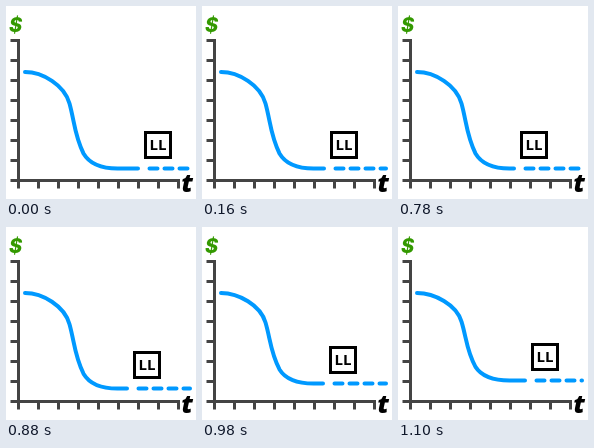
An HTML page for the animation above (6120 ms loop, 190x193 px).

```html
<!DOCTYPE html>
<html lang="en">
<head>
<meta charset="utf-8">
<style>
  html, body { margin: 0; width: 100%; height: 100%; overflow: hidden; background: #fff; }
  svg { display: block; width: 190px; height: 193px; }
  .axes { stroke: #444; stroke-width: 3; fill: none; }
  .line { stroke: #09f; stroke-width: 4; fill: none; stroke-linecap: round; }
  .price { font: italic 800 20px Inter, sans-serif; fill: #390; }
  .time { font: italic 800 25px "Open Sans", "Noto Sans", sans-serif; }
  .tag { font: 700 15px "Open Sans", "Noto Sans", sans-serif; text-anchor: middle; }
</style>
</head>
<body>
<svg viewBox="0 0 190 193">
  <path class="axes" id="axes" transform="translate(.5 .5)"/>
  <path class="line" id="curve"/>
  <path class="line" id="forecast" stroke-dasharray="8 7"/>
  <g id="box">
    <rect x="1.5" y="1.5" width="25" height="25" fill="#fff" stroke="#000" stroke-width="3"/>
    <text class="tag" x="14" y="19">LL</text>
  </g>
  <text class="price" x="3" y="25.5">$</text>
  <text class="time" x="175.5" y="185.5">t</text>
</svg>
<script>
const PERIOD = 6120;
const TOP = 66, FLOOR = 162.5;
const slideTimes = [20, 50, 80, 100, 130, 150, 180, 200, 230, 250, 280];
const riseTimes = [780, 830, 850, 880, 900, 920, 940, 960, 980, 1000, 1030, 1050, 1080, 1100];
const $ = id => document.getElementById(id);

let axes = "M12 32.5V182M4 174H173.5";
for (let i = 0; i < 8; i++) axes += `M4 ${34 + 20 * i}H12M${32 + 20 * i} 174V182`;
$("axes").setAttribute("d", axes);

const stepsDone = (times, t) => times.filter(time => time <= t).length;
const part = (step, from, to) => Math.min(1, Math.max(0, (step - from) / (to - from)));

function draw(t) {
  const slide = stepsDone(slideTimes, t);
  const rise = stepsDone(riseTimes, t);
  // left, then right, up, and right again
  const x = Math.round(138 - 18 * part(slide, 0, 11) + 7 * part(rise, 0, 3) + 6 * part(rise, 12, 14));
  const y = FLOOR - 9 * part(rise, 3, 12);
  const scaled = v => TOP + (v - TOP) * (y - TOP) / (FLOOR - TOP);

  $("curve").setAttribute("d", `M19 ${TOP}
    C36.5 ${TOP} 58.5 ${scaled(79)} 63.5 ${scaled(97.5)}
    C68.5 ${scaled(115.5)} 68.5 ${scaled(129.5)} 77.5 ${scaled(147.5)}
    C84.5 ${scaled(159.5)} 97.5 ${y} 111.5 ${y}H${x - 6}`);
  $("forecast").setAttribute("d", `M${x + 5.5} ${y}H184`);
  $("box").setAttribute("transform", `translate(${x} ${y - 37.5})`);
}

const start = performance.now();
function tick() {
  draw((performance.now() - start) % PERIOD);
  requestAnimationFrame(tick);
}
tick();
</script>
</body>
</html>
```
